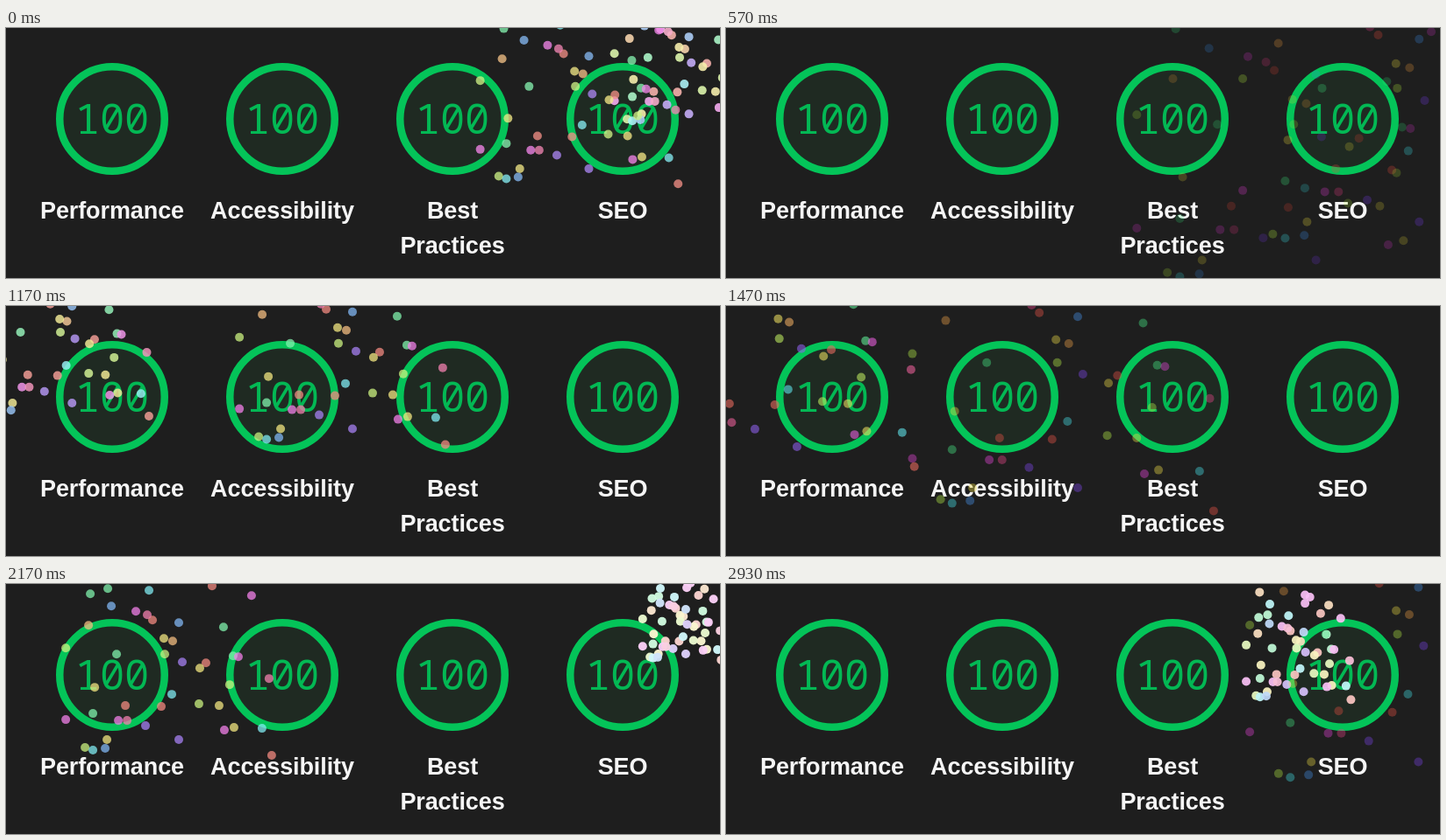
Animation of 814x286 px, one loop 2960 ms. Source, as an HTML page with a canvas:

```html
<!DOCTYPE html>
<html lang="en">
<head>
<meta charset="utf-8">
<title>Perfect scores</title>
<style>
  html, body { margin: 0; width: 100%; height: 100%; overflow: hidden; background: #1e1e1e; }
  svg, canvas { position: absolute; left: 0; top: 0; }
  text { text-anchor: middle; }
  .label { font: bold 27px "Liberation Sans", Arial, sans-serif; letter-spacing: -.1px; fill: #f5f5f5; }
  .score { font: 500 47px "Noto Sans Mono", monospace; fill: #03b854; }
  circle { fill: #1f2a22; stroke: #04c459; stroke-width: 8.5; }
</style>
</head>
<body>
<svg id="gauges" width="814" height="286"></svg>
<canvas id="sky" width="814" height="286"></canvas>
<script>
const LOOP = 2960, SPREAD = 1.63, FALL = 157, BURST = 731;

const labels = [["Performance"], ["Accessibility"], ["Best", "Practices"], ["SEO"]];
document.getElementById("gauges").innerHTML = labels.map((lines, i) => {
  const x = 121 + 194 * i;
  return `<circle cx="${x}" cy="104" r="59.75"/><text class="score" x="${x}" y="121">100</text>` +
    lines.map((s, j) => `<text class="label" x="${x}" y="${218 + 40 * j}">${s}</text>`).join("");
}).join("");

// Spark offsets grouped by hue
const sparks = {
  5: [[-17, -111], [44, -62], [-48, -13], [-7, -12], [119, 44], [51, -150]],
  32: [[-90, -105], [6, -87], [-86, -198], [69, -169]],
  54: [[-4, -90], [37, -56], [-83, -34], [-69, 26], [59, -13], [76, 12]],
  80: [[-116, -79], [-3, -72], [-94, 35], [36, -15], [71, -37]],
  143: [[-88, -141], [-68, -147], [-58, -72], [-85, -4], [75, -70], [64, -103]],
  183: [[-21, -145], [5, -26], [-85, 38], [108, 13], [-63, -171]],
  212: [[-64, -127], [13, -108], [-71, 36]],
  260: [[17, -63], [-25, 10], [13, 26]],
  305: [[-36, -121], [-116, 3], [-56, 4], [65, 15], [81, -69], [96, -139], [16, -192], [27, -187], [16, -173]],
  335: [[-23, -117], [-46, 4], [116, -44]]
};

// Burst centres visited in turn by each emitter
const spots = [[382, 75.5], [184, 113], [652, 100], [64.5, 63], [770, 64.5]];
const emitters = [{ period: 1000, first: 0 }, { period: 1250, first: 3 }];

// cubic-bezier(.42, 0, 1, 1)
function easeIn(p) {
  let lo = 0, hi = 1;
  for (let i = 0; i < 24; i++) {
    const s = (lo + hi) / 2, q = 1 - s;
    if (1.26 * q * q * s + 3 * q * s * s + s ** 3 < p) lo = s; else hi = s;
  }
  return lo * lo * (3 - 2 * lo);
}
const easeOut = p => 1 - easeIn(1 - p);

const ctx = document.getElementById("sky").getContext("2d");

function drawBurst({ period, first }, t) {
  const turns = (t - BURST) / period, n = Math.floor(turns), p = turns - n;
  const [ox, oy] = spots[(n + first + 5) % 5];
  const grow = easeOut(p), drop = easeIn(p);
  ctx.globalAlpha = 1 - drop;
  for (const hue in sparks) {
    ctx.fillStyle = `hsl(${hue}, 80%, ${100 - 45 * grow}%)`;
    for (const [x, y] of sparks[hue]) {
      ctx.beginPath();
      ctx.arc(ox + x * SPREAD * grow, oy + y * SPREAD * grow + FALL * drop, 5, 0, 7);
      ctx.fill();
    }
  }
}

const start = performance.now();
function draw() {
  const elapsed = Math.max(0, performance.now() - start) % LOOP;
  const t = Math.floor((elapsed + 3.4) * .03) / .03; // 30 steps per second
  ctx.clearRect(0, 0, 814, 286);
  for (const e of emitters) drawBurst(e, t);
  requestAnimationFrame(draw);
}
draw();
</script>
</body>
</html>
```
